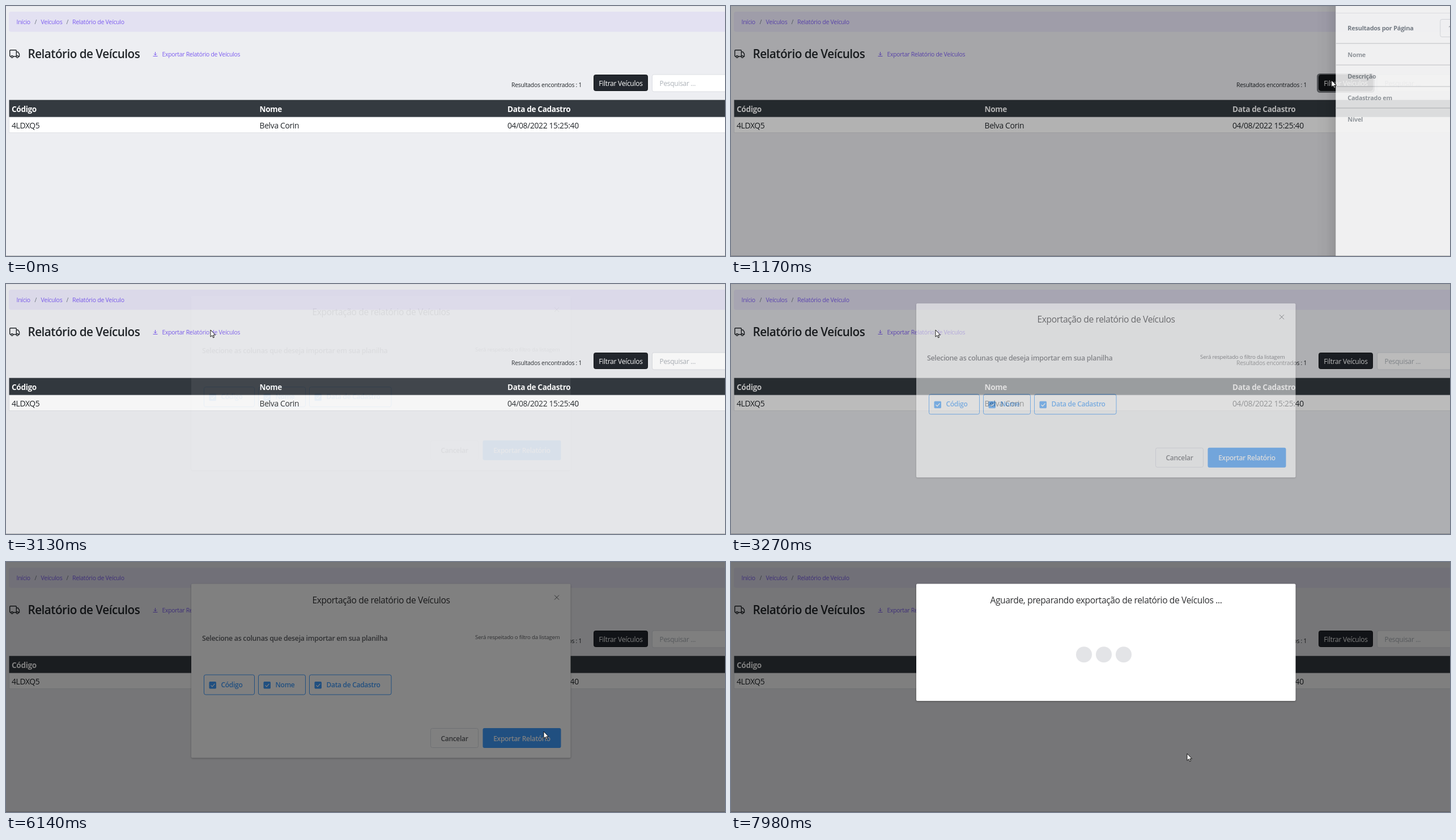
An HTML page that plays this animation: 1269x441 px, repeating every 8 s.

```html
<!DOCTYPE html>
<html lang="pt">
<head>
<meta charset="utf-8">
<title>Relatório de Veículos</title>
<style>
  html, body { margin: 0; width: 100%; height: 100%; overflow: hidden; background: #edeef2; }
  svg { display: block; width: 1269px; height: 441px; }
  text { font-family: "Open Sans", "Noto Sans", sans-serif; letter-spacing: -.025em; white-space: pre; }
  .dim { filter: brightness(.5); }
  .dialog { filter: drop-shadow(0 1px 1.5px rgba(0, 0, 0, .3)); }
</style>
</head>
<body>
<svg id="stage" viewBox="0 0 1269 441"></svg>
<script>
const text = (x, y, size, fill, str, weight = 400, anchor = 'start') =>
  `<text x="${x}" y="${y}" font-size="${size}" font-weight="${weight}" text-anchor="${anchor}" style="fill:${fill}">${str}</text>`;
const rect = (x, y, w, h, fill, stroke = 'none', r = 0, more = '') =>
  `<rect x="${x}" y="${y}" width="${w}" height="${h}" rx="${r}" style="fill:${fill};stroke:${stroke}" ${more}/>`;

const purple = '#7c5cf0';
const dark = '#212529';
const blue = '#409eff';
const ink = '#303133';
const body = '#606266';
const line = '#dcdfe6';

const page = () => `
  ${rect(0, 0, 1269, 441, '#edeef2')}
  ${rect(0, 0, 1269, 1, '#e4e5e9')}
  ${rect(5, 10, 1280, 35.5, '#e3e1f2', 'none', 4)}
  ${text(18.5, 32, 10.5, purple, 'Início')}
  ${text(50.5, 32, 10.5, '#6c757d', '/')}
  ${text(61.5, 32, 10.5, purple, 'Veículos')}
  ${text(106.5, 32, 10.5, '#6c757d', '/')}
  ${text(117, 32, 10.5, purple, 'Relatório de Veículo')}
  <g fill="none" stroke="${dark}" stroke-width="1.4">
    <path d="M9 89H8Q6.700 89 6.700 87.700V79Q6.700 77.700 8 77.700H17Q18.300 77.700 18.300 79V89H12.500M18.300 81H21L23.500 84.500V89H22"/>
    <circle cx="10.700" cy="89.500" r="1.800"/><circle cx="20" cy="89.500" r="1.800"/>
  </g>
  ${text(38.5, 91.5, 20.7, dark, 'Relatório de Veículos', 600)}
  <g id="link">
    <path d="M263.500 81V86.500M261 84.200L263.500 86.700L266 84.200M259.500 88.500H267.500" fill="none" stroke="${purple}"/>
    ${text(275.5, 88.5, 10.4, purple, 'Exportar Relatório de Veículos')}
  </g>
  ${text(892, 143, 10.4, dark, 'Resultados encontrados : 1')}
  ${rect(1035.5, 120.5, 99, 31, 'none', '#74777c', 4, 'id="ring" stroke-width="3"')}
  ${rect(1037.5, 121.5, 95, 28, '#23272e', '#14171a', 3, 'id="filter"')}
  ${text(1085, 140.5, 12.1, '#fff', 'Filtrar Veículos', 400, 'middle')}
  ${rect(1140.5, 121, 150, 30, '#fff', '#dcdee3', 3)}
  ${text(1153.5, 141, 12, '#adb2b8', 'Pesquisar ...')}
  ${rect(5.5, 196, 1280, 27.5, '#fff', '#dfe1e5')}
  ${rect(5.5, 165.7, 1280, 30, '#343a40')}
  ${[[10, 'Código', '4LDXQ5'], [447.5, 'Nome', 'Belva Corin'], [885, 'Data de Cadastro', '04/08/2022 15:25:40']]
    .map(([x, head, cell]) => text(x, 187, 13.6, '#fff', head, 700) + text(x, 215.7, 13.9, dark, cell)).join('')}`;

const drawer = () => `
  ${rect(-36, 0, 36, 441, 'url(#shade)')}
  ${rect(0, 0, 420, 441, '#fff')}
  ${rect(0, 12, 420, 1, '#e8e9eb')}
  ${[65, 103, 141, 179].map(y => rect(0, y + .3, 420, 1.5, '#d6d7da')).join('')}
  ${text(21, 43, 11, '#6c757d', 'Resultados por Página', 700)}
  ${['Nome', 'Descrição', 'Cadastrado em', 'Nível']
    .map((label, i) => text(21, 90 + 38 * i, 10.9, '#8b9197', label, 700)).join('')}
  ${rect(184.5, 23.5, 160, 31, '#fff', '#d9dce0', 3)}
  ${text(198.5, 44, 12, '#6c757d', '10 resultados')}`;

const option = (x, w, label, id) => `
  ${rect(x + .5, 199, w, 35, 'none', blue, 3, `id="${id}Frame"`)}
  ${rect(x + 10, 211.5, 11.5, 11.5, blue, blue, 1, `id="${id}Box"`)}
  <path d="M${x + 12.5} 217.300l2.500 2.500 4.500-5" fill="none" stroke="#fff" stroke-width="1.200"/>
  <g id="${id}Label" color="${blue}">${text(x + 30.5, 220.5, 12, 'currentColor', label, 600)}</g>`;

const exportDialog = () => `
  ${rect(327, 38.5, 669.5, 307, '#fff', 'none', 2, 'class="dialog"')}
  ${text(662, 72.5, 15.64, ink, 'Exportação de relatório de Veículos', 400, 'middle')}
  <path d="M968 58.500l8 8m0-8l-8 8" stroke="${body}"/>
  ${text(346, 139, 12.4, body, 'Selecione as colunas que deseja importar em sua planilha', 600)}
  ${text(977.5, 136, 9.75, body, 'Será respeitado o filtro da listagem', 400, 'end')}
  ${option(349, 89, 'Código', 'code')}
  ${option(445, 83, 'Nome', 'name')}
  ${option(535, 144.5, 'Data de Cadastro', 'date')}
  ${rect(749.5, 293.5, 84, 34, 'none', line, 3)}
  ${text(791.5, 315.5, 12, body, 'Cancelar', 600, 'middle')}
  ${rect(841.5, 293, 138, 35, blue, 'none', 3)}
  ${text(910.5, 315.5, 12, '#fff', 'Exportar Relatório', 600, 'middle')}`;

const confirmBox = () => `
  ${rect(470, 190, 384, 132, '#fff', 'none', 3, 'class="dialog"')}
  ${text(486, 215, 14, ink, 'Exportar Relatório')}
  ${text(486, 251, 12, body, 'Deseja exportar o relatório?')}
  ${rect(684.5, 281.5, 76, 28, '#fff', line, 3)}
  ${text(722.5, 300, 11, body, 'Cancelar', 600, 'middle')}
  ${rect(769, 281, 76, 29, blue, 'none', 3)}
  ${text(807, 300, 11, '#fff', 'Confirmar', 600, 'middle')}`;

const waitDialog = () => `
  ${rect(327, 38.5, 669.5, 206.5, '#fff', 'none', 2, 'class="dialog"')}
  ${text(662, 72.5, 15.64, ink, 'Aguarde, preparando exportação de relatório de Veículos ...', 400, 'middle')}
  <g id="dots" fill="#e0e1e4">${[623, 658, 693].map(x => `<circle cx="${x}" cy="163.300" r="16"/>`).join('')}</g>`;

document.getElementById('stage').innerHTML = `
  <defs><linearGradient id="shade">
    <stop offset="0" stop-opacity="0"/><stop offset=".5" stop-opacity=".03"/><stop offset="1" stop-opacity=".13"/>
  </linearGradient></defs>
  ${page()}
  ${rect(0, 0, 1269, 441, '#000', 'none', 0, 'id="veil"')}
  <g id="drawer">${drawer()}</g>
  <g id="export" color-interpolation-filters="sRGB">${exportDialog()}</g>
  <g id="confirm">${confirmBox()}</g>
  <g id="wait">${waitDialog()}</g>
  ${rect(0, 440, 1269, 1, '#000', 'none', 0, 'opacity=".22"')}
  <g id="cursor" stroke="#000" fill="#fff" stroke-linejoin="round">
    <path id="arrow" stroke-width=".9" d="M0 0V12.200L2.800 9.600L4.700 13.800L6.500 13L4.700 9H8.500Z"/>
    <path id="hand" stroke-width="1" d="M-1.300 1.200Q0-.800 1.300 1.200V5.800L2.200 5.200L3.600 6L5 5.800L6 6.900Q7.500 6.600 7.500 8.500V11.500L6 16H-1.500L-4.500 10.500Q-5.200 8.500-3.400 8.700L-1.300 10.500Z"/>
  </g>`;

const el = {};
document.querySelectorAll('[id]').forEach(node => el[node.id] = node);

const ramp = (t, from, to) => Math.min(1, Math.max(0, (t - from) / (to - from)));
const smooth = p => p * p * (3 - 2 * p);
const within = (t, from, to) => t >= from && t < to;
const show = (node, visible) => node.setAttribute('visibility', visible ? 'visible' : 'hidden');
const fade = (node, opacity) => node.setAttribute('opacity', opacity);

// Cursor stops: time, x, y
const stops = [
  [70, 1206, 405], [750, 1060, 131], [1500, 1060, 131], [1700, 785, 86], [1780, 795, 94],
  [2250, 795, 94], [2600, 590, 73], [2980, 361, 81], [3350, 361, 81], [3800, 390, 214],
  [4000, 390, 214], [4360, 479, 213], [4480, 525, 229], [4710, 392, 216], [4930, 392, 216],
  [5610, 1008, 288], [6020, 949, 299], [6170, 949, 299], [6480, 800, 297],
  [7400, 800, 297], [7800, 805, 338], [8000, 805, 338]
];
const handSpans = [[650, 1020], [2850, 3110], [3740, 5060], [5850, 6110], [6400, 6760]];

function cursorAt(t) {
  const next = Math.max(1, stops.findIndex(s => s[0] > t));
  const [a, b] = [stops[next - 1], stops[next]];
  const p = smooth(ramp(t, a[0], b[0]));
  return [a[1] + (b[1] - a[1]) * p, a[2] + (b[2] - a[2]) * p];
}

// Dialogs drop 20px while fading in and rise again on the way out.
function drop(node, enter, leave = 1) {
  const p = Math.min(enter, leave);
  fade(node, p);
  node.setAttribute('transform', `translate(0 ${-20 * (1 - p) ** 2})`);
}

function render(t) {
  const closing = ramp(t, 1935, 2030);
  const slide = (1 - (1 - ramp(t, 890, 1290)) ** 1.5) * (1 - closing);
  const opening = ramp(t, 3110, 3410);
  fade(el.veil, .3 * ramp(t, 890, 990) * (1 - closing) + .5 * opening);
  fade(el.drawer, slide);
  el.drawer.setAttribute('transform', `translate(${1018 + 304 * (1 - slide)} 0)`);

  drop(el.export, opening, 1 - ramp(t, 6760, 7000));
  el.export.classList.toggle('dim', t >= 6130);
  drop(el.confirm, ramp(t, 6180, 6480), 1 - ramp(t, 6690, 6900));
  drop(el.wait, ramp(t, 6830, 7130));

  const checked = !within(t, 3940, 4860);
  el.codeFrame.style.stroke = checked ? blue : line;
  el.codeBox.style.fill = checked ? blue : '#fff';
  el.codeLabel.setAttribute('color', checked ? blue : body);

  const phase = ((t - 7980 + 328) / 750 % 1 + 1) % 1;
  const grow = Math.min(1, phase * 2);
  fade(el.dots, phase < .5 ? grow : 2 - 2 * phase);
  for (const dot of el.dots.children) dot.setAttribute('r', 16 * grow);

  show(el.ring, within(t, 880, 2990));
  el.filter.style.fill = within(t, 650, 1300) ? '#14171a' : '#23272e';
  fade(el.link, within(t, 2850, 3110) ? .85 : 1);

  const [x, y] = cursorAt(t);
  const hand = handSpans.some(([from, to]) => within(t, from, to));
  el.cursor.setAttribute('transform', `translate(${x} ${y})`);
  show(el.arrow, t >= 70 && !hand);
  show(el.hand, t >= 70 && hand);
}

const start = performance.now();
function tick() {
  render((performance.now() - start) % 8000);
  requestAnimationFrame(tick);
}
tick();
</script>
</body>
</html>
```
